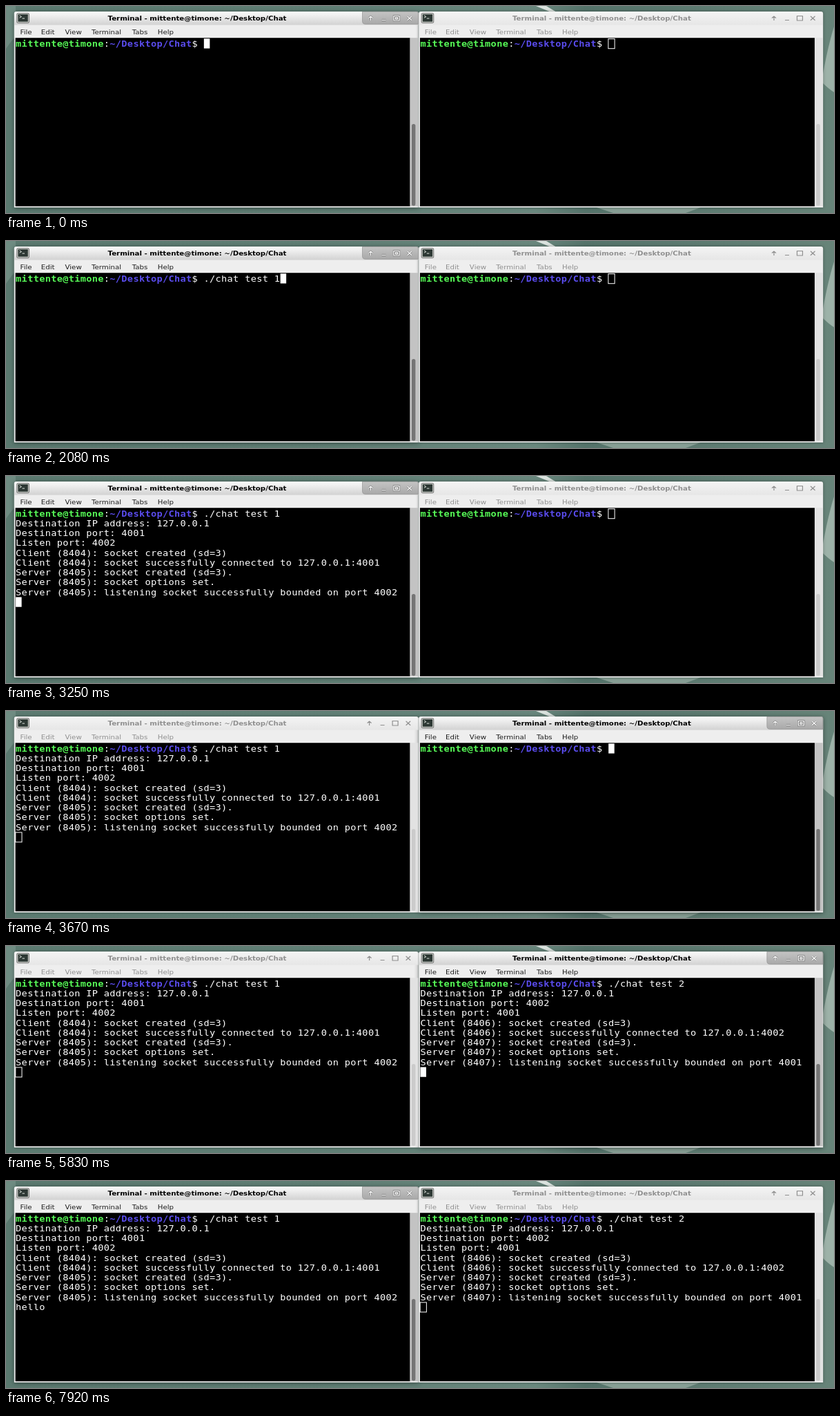
An HTML page for the animation above (8000 ms loop, 1200 by 300 pixels).

```html
<!DOCTYPE html>
<html lang="en">
<head>
<meta charset="utf-8">
<title>Two terminals chatting</title>
<style>
  html, body { margin: 0; width: 100%; height: 100%; overflow: hidden; background: #5c7b71; }
  svg { display: block; width: 100vw; height: 100vh; }
  text { white-space: pre; }
  .ui { font: 12px "DejaVu Sans", sans-serif; }
  .title { font-weight: bold; text-anchor: middle; }
  .term { font: 16px "DejaVu Sans Mono", monospace; letter-spacing: .368px; fill: #fff; }
  .user { font-weight: bold; fill: #57fb57; }
  .path { font-weight: bold; fill: #5a4cee; }
  .frame { filter: drop-shadow(0 .5px 2px rgba(0, 0, 0, .35)); }
  .frame.on { filter: drop-shadow(0 1px 3px rgba(0, 0, 0, .45)); }
</style>
</head>
<body>
<svg viewBox="0 0 1200 300" preserveAspectRatio="none">
  <defs>
    <linearGradient id="wall">
      <stop offset="0" stop-color="#5b7a70"/>
      <stop offset=".4" stop-color="#607f75"/>
      <stop offset=".64" stop-color="#69877d"/>
      <stop offset=".7" stop-color="#54736a"/>
      <stop offset="1" stop-color="#678479"/>
    </linearGradient>
    <linearGradient id="barOn" x2="0" y2="1">
      <stop offset="0" stop-color="#fafafa"/>
      <stop offset="1" stop-color="#d2d2d2"/>
    </linearGradient>
    <linearGradient id="barOff" x2="0" y2="1">
      <stop offset="0" stop-color="#f4f4f4"/>
      <stop offset="1" stop-color="#e6e6e6"/>
    </linearGradient>
    <linearGradient id="panel" x2="0" y2="1">
      <stop offset="0" stop-color="#c4c4c4"/>
      <stop offset="1" stop-color="#a9a9a9"/>
    </linearGradient>
  </defs>
  <rect width="1200" height="300" fill="url(#wall)"/>
  <path d="M0 62Q8 50 14 44V0H0Z" fill="#6f8c82"/>
  <path d="M1200 30Q1190 62 1182 110Q1192 120 1200 125Z" fill="#9db2a8"/>
  <path d="M850 290H1012L985 300H880Z" fill="#869e94"/>
  <path d="M768 0H783L798 9H790Z" fill="#dbe3df"/>
  <g id="stage"></g>
</svg>
<script>
const LOOP = 8000;
const SX = 1200 / 1408, SY = 0.75;           // the desktop is 1408 x 400
const CELL_W = 10 * SX, CELL_H = 19 * SY;
const TERM_X = 14.1, TERM_Y = 47.25, WINDOW_STEP = 688 * SX;
const USER = "mittente@timone", PATH = "~/Desktop/Chat";
const FADED = "#8f8f8f";

const MENU = [["File", 20.5], ["Edit", 50.7], ["View", 85.5], ["Terminal", 124], ["Tabs", 182.7], ["Help", 219.7]];
const KEYS = [[6500, "h"], [6670, "e"], [6830, "l"], [6910, "l"], [7080, "o"]];
const BLINK_OFF = [[420, 920], [1580, 1660], [2750, 3250], [5250, 5750], [6420, 6500], [7580, LOOP]];
const FOCUS_RIGHT = [3420, 5920];
const SHELLS = [
  { command: 1660, run: 2170, test: 1, dest: 4001, listen: 4002, pid: 8404 },
  { command: 4080, run: 4670, test: 2, dest: 4002, listen: 4001, pid: 8406 },
];

const within = (t, [from, to]) => t >= from && t < to;

const text = (x, y, cls, content, fill = "") =>
  `<text class="${cls}" transform="translate(${x} ${y}) scale(${SX} ${SY})"${fill && ` fill="${fill}"`}>${content}</text>`;

const rect = (x, y, w, h, fill, extra = "") =>
  `<rect x="${x}" y="${y}" width="${w}" height="${h}" fill="${fill}" ${extra}/>`;

const path = (d, stroke, width) =>
  `<path d="${d}" fill="none" stroke="${stroke}" stroke-width="${width}"/>`;

const output = ({ dest, listen, pid }) => [
  "Destination IP address: 127.0.0.1",
  `Destination port: ${dest}`,
  `Listen port: ${listen}`,
  `Client (${pid}): socket created (sd=3)`,
  `Client (${pid}): socket successfully connected to 127.0.0.1:${dest}`,
  `Server (${pid + 1}): socket created (sd=3).`,
  `Server (${pid + 1}): socket options set.`,
  `Server (${pid + 1}): listening socket successfully bounded on port ${listen}`,
];

function frame(i, active) {
  const d = "M11.8 292V11Q11.8 8 15 8H594.6Q597.8 8 597.8 11V292Z";
  return `<path class="frame ${active ? "on" : ""}" d="${d}" transform="translate(${i * WINDOW_STEP})" fill="#eee"/>`;
}

function buttons(active) {
  const x = active ? 528.5 : 526.6;
  const d = `M${x} 21V15.5M${x - 3} 17.5L${x} 15L${x + 3} 17.5` +
    `M${x + 16} 20.5h6` +
    `M${x + 33.5} 14.5h8v6.5h-8Z` + (active ? `M${x + 36} 16.7h3v2.2h-3Z` : "") +
    `M${x + 53} 14.8l6.6 6M${x + 59.6} 14.8l-6.6 6`;
  if (!active) return path(d, FADED, 1.2);
  return `<path d="M516.5 8.3H595Q597.6 8.3 597.6 11V26.3H521Q516.5 26.3 516.5 22Z"
    fill="url(#panel)" stroke="#939393" stroke-width=".7"/>` + path(d, "#747474", 2.4) + path(d, "#fff", 1.2);
}

function chrome(active) {
  const ink = active ? "#1c1c1c" : FADED;
  return `<path d="M12.3 27.5V11Q12.3 8.4 15.3 8.4H594.6Q597.4 8.4 597.4 11V27.5Z" fill="url(#${active ? "barOn" : "barOff"})"/>` +
    buttons(active) +
    rect(15.8, 10.5, 17.6, 14, "#d4d6d2", 'rx="1.5" stroke="#555" stroke-width=".8"') +
    rect(17.4, 12, 14.4, 10.8, "#2d3834") +
    path("M19.5 13.8l3 1.7l-3 1.7M23.5 18h3.5", "#dfe5df", 1) +
    text(277, 21, "ui title", `Terminal - ${USER}: ${PATH}`, active ? "#000" : FADED) +
    MENU.map(([name, x]) => text(x, 40.5, "ui", name, ink)).join("") +
    rect(13.6, 46.2, 572, 244.1, "#000") +
    rect(585.6, 46.2, 11.6, 244.1, active ? "#c3c3c3" : "#e2e2e2") +
    rect(588, 171, 5.4, 118.5, active ? "#757575" : "#cbcbcb", 'rx="2.5"');
}

function shell(i, t, active) {
  const s = SHELLS[i];
  const command = t >= s.command ? `./chat test ${s.test}` : "";
  const prompt = `<tspan class="user">${USER}</tspan>:<tspan class="path">${PATH}</tspan>$ ${command}`;
  const lines = [prompt];
  let col = USER.length + PATH.length + 3 + command.length;
  if (t >= s.run) {
    const typed = i ? "" : KEYS.filter(([at]) => t >= at).map(([, key]) => key).join("");
    lines.push(...output(s), typed);
    col = typed.length;
  }
  const x = TERM_X + col * CELL_W, y = TERM_Y + (lines.length - 1) * CELL_H;
  let cursor = "";
  if (!active) cursor = rect(x - .3, y + .4, CELL_W + .7, CELL_H - .2, "none", 'stroke="#fff"');
  else if (!BLINK_OFF.some(span => within(t, span))) cursor = rect(x, y, CELL_W, CELL_H, "#fff");
  return lines.map((line, row) => text(TERM_X, TERM_Y + 11.25 + row * CELL_H, "term", line)).join("") + cursor;
}

function scene(t) {
  const focus = +within(t, FOCUS_RIGHT);
  const both = draw => [0, 1].map(i => draw(i, i === focus)).join("");
  return both(frame) + both((i, active) =>
    `<g transform="translate(${i * WINDOW_STEP})">${chrome(active)}${shell(i, t, active)}</g>`);
}

const stage = document.getElementById("stage");
const start = performance.now();
let shown = "";

function tick() {
  const next = scene((performance.now() - start) % LOOP);
  if (next !== shown) stage.innerHTML = shown = next;
  requestAnimationFrame(tick);
}
tick();
</script>
</body>
</html>
```
